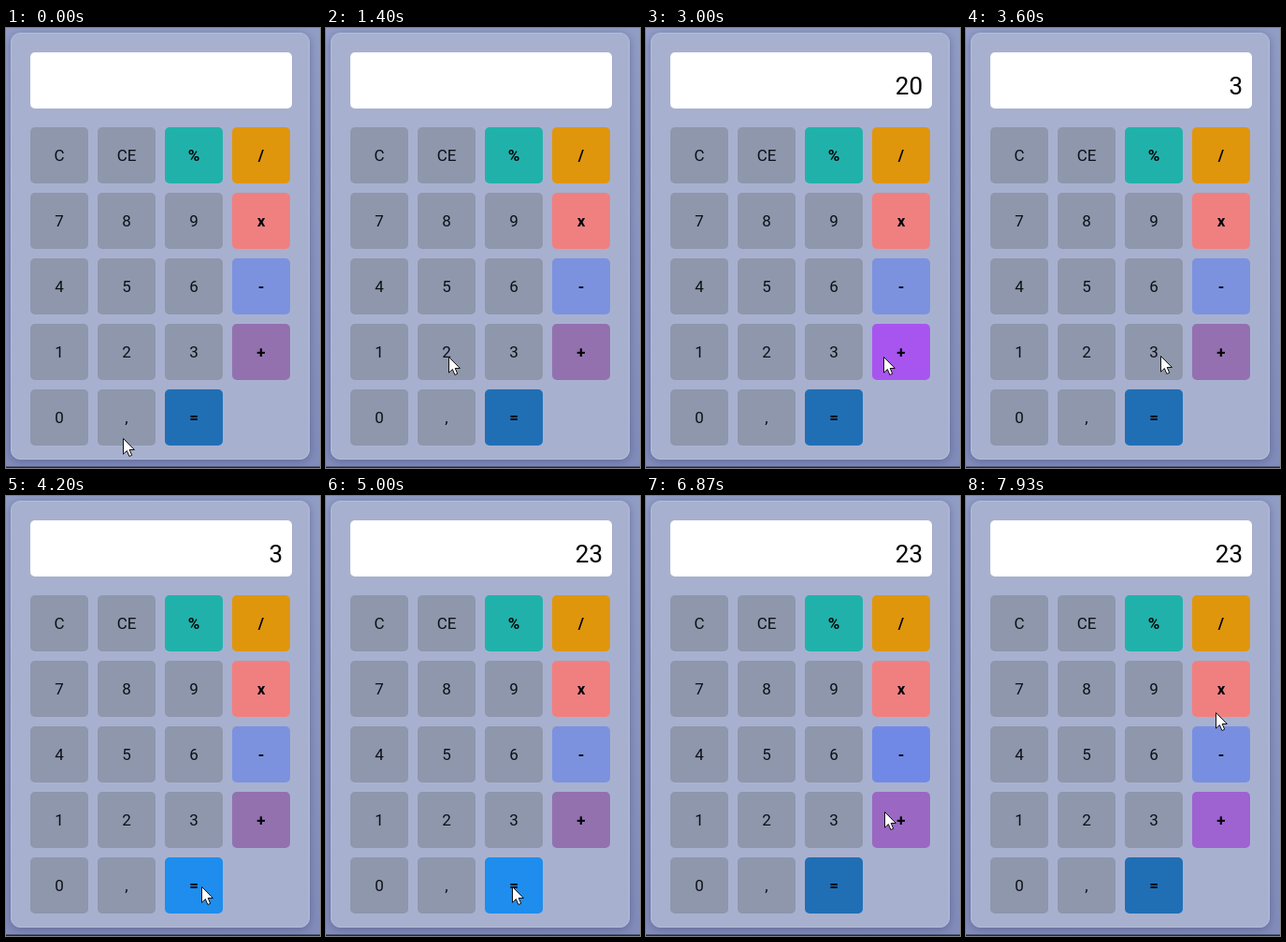
Write an HTML page that moves like this. It is 336x470 px and loops after 8000 ms.

```html
<!DOCTYPE html>
<html lang="en">
<head>
<meta charset="utf-8">
<title>Calculator</title>
<style>
  html, body { margin: 0; width: 100%; height: 100%; overflow: hidden; background: #8c97c0; }
  svg { display: block; width: 336px; height: 470px; font-family: Roboto, sans-serif; }
  text { fill: #0d1018; }
  .label { font-size: 17px; text-anchor: middle; }
  .bold { font-weight: 700; fill: #05070c; }
  #display { font-size: 26px; text-anchor: end; fill: #000; }
  #panel { filter: drop-shadow(0 2px 5px rgba(40, 50, 100, .38)); }
</style>
</head>
<body>
<svg viewBox="0 0 336 470">
  <defs>
    <linearGradient id="back" x2="0" y2="1">
      <stop stop-color="#919dc5"/><stop offset="1" stop-color="#828cba"/>
    </linearGradient>
  </defs>
  <rect width="336" height="470" fill="url(#back)"/>
  <rect y="468.5" width="336" height="1.5" fill="#20263f"/>
  <rect id="panel" x="5.5" y="5.5" width="319" height="455" rx="9.5" fill="#a7b1cf" stroke="#b5bed8"/>
  <rect x="26" y="26" width="280" height="60" rx="5" fill="#fff"/>
  <text id="display" x="296" y="71"></text>
  <g id="keys"></g>
  <path id="cursor" d="M.5 .5V17.2L4.4 13.6L6.9 19.5L9.7 18.3L7.2 12.5H12.4Z" fill="#fff" stroke="#111" stroke-linejoin="round"/>
</svg>
<script>
const LOOP = 8000, FADE = 400;
const GREY = '#8e97ab';
const rows = ['C CE % /', '7 8 9 x', '4 5 6 -', '1 2 3 +', '0 , ='];

// Rest colour, hover colour and the times the pointer enters and leaves.
const operators = {
  '%': { rest: [32, 178, 170] },
  '/': { rest: [224, 150, 12] },
  'x': { rest: [240, 128, 128], hover: [246, 114, 114], visits: [[7900, 8000]] },
  '-': { rest: [124, 146, 222], hover: [108, 133, 234], visits: [[6160, 6720], [7740, 7900]] },
  '+': { rest: [147, 113, 174], hover: [168, 85, 240], visits: [[2600, 3240], [6720, 7740]] },
  '=': { rest: [32, 111, 181], hover: [30, 141, 238], visits: [[3770, 5520]] }
};

// Pointer stops: time, x, y.
const stops = [
  [0, 125, 438], [870, 125, 440], [1200, 131, 351], [1600, 131, 351],
  [2050, 59, 424], [2270, 59, 424], [2820, 254, 351], [3140, 254, 351],
  [3440, 208, 350], [3640, 208, 350], [3950, 209, 417], [4250, 209, 417],
  [4700, 199, 417], [5400, 199, 417], [5670, 256, 294], [6080, 240, 281],
  [6200, 246, 273], [6580, 246, 273], [7000, 258, 355], [7660, 258, 355],
  [7930, 267, 231], [8000, 267, 227]
];

// Display contents from each time on.
const readouts = [[0, ''], [1530, '2'], [2150, '20'], [3580, '3'], [4480, '23']];

const byId = id => document.getElementById(id);
const clamp = v => Math.max(0, Math.min(1, v));
const smooth = v => v * v * (3 - 2 * v);
const mix = (a, b, k) => a + (b - a) * k;
const rgb = c => `rgb(${c.map(Math.round)})`;

function add(tag, attributes, content = '') {
  const node = document.createElementNS('http://www.w3.org/2000/svg', tag);
  for (const name in attributes) node.setAttribute(name, attributes[name]);
  node.textContent = content;
  return byId('keys').appendChild(node);
}

rows.forEach((row, r) => row.split(' ').forEach((label, c) => {
  const x = 26 + 72 * c, y = 106 + 70 * r, op = operators[label];
  const rect = add('rect', { x, y, width: 62, height: 60, rx: 5, fill: op ? rgb(op.rest) : GREY });
  add('text', { x: x + 31, y: y + 36, class: op ? 'label bold' : 'label' }, label);
  if (op) op.rect = rect;
}));

function hoverLevel(visits, t) {
  return Math.max(...visits.map(([enter, leave]) => {
    const peak = clamp((Math.min(t, leave) - enter) / FADE);
    return smooth(clamp(peak - Math.max(0, t - leave) / FADE));
  }));
}

function pointerAt(t) {
  const i = Math.max(1, stops.findIndex(s => s[0] > t));
  const [t0, x0, y0] = stops[i - 1], [t1, x1, y1] = stops[i];
  const k = smooth((t - t0) / (t1 - t0));
  return [mix(x0, x1, k), mix(y0, y1, k)];
}

function draw(t) {
  byId('display').textContent = readouts.filter(([from]) => from <= t).pop()[1];
  byId('cursor').setAttribute('transform', `translate(${pointerAt(t).map(Math.round)})`);
  for (const { rect, rest, hover, visits } of Object.values(operators)) {
    if (!hover) continue;
    const level = hoverLevel(visits, t);
    rect.setAttribute('fill', rgb(rest.map((v, i) => mix(v, hover[i], level))));
  }
}

const start = performance.now();
function tick() {
  draw((performance.now() - start) % LOOP);
  requestAnimationFrame(tick);
}
tick();
</script>
</body>
</html>
```
